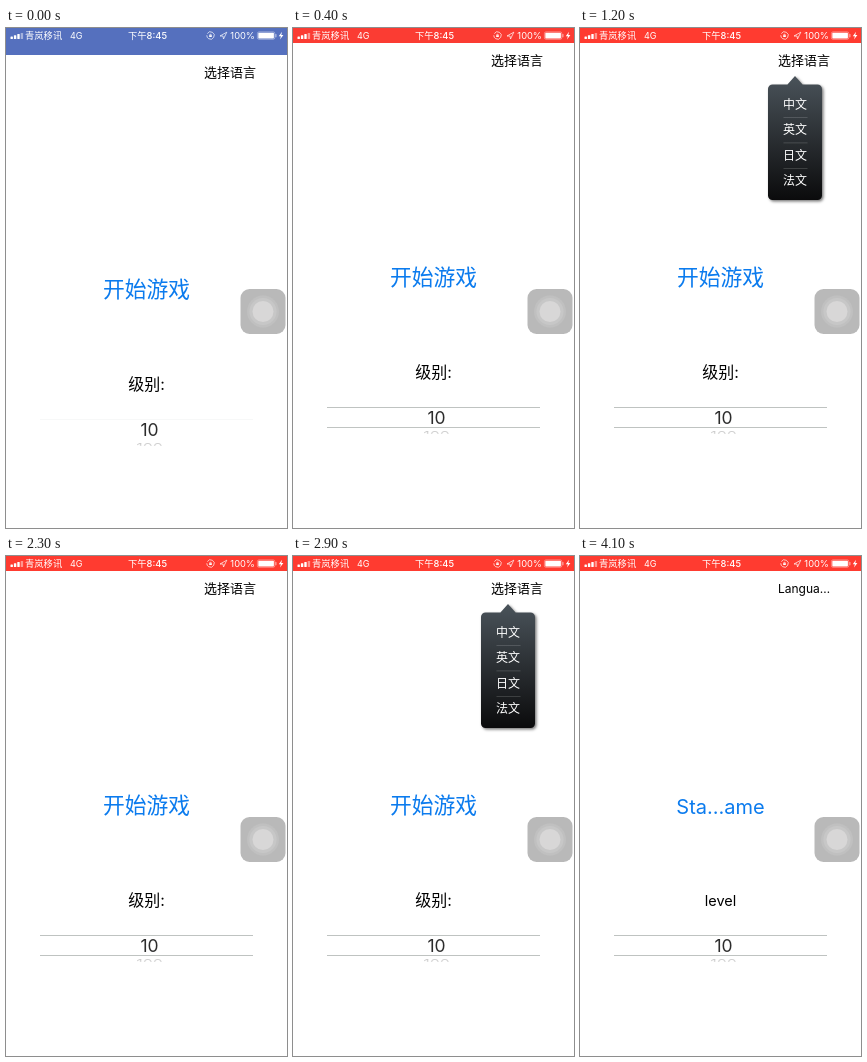
An HTML page with a canvas for the animation above (5000 ms loop, 281x500 px).

```html
<!DOCTYPE html>
<html lang="zh-CN">
<head>
<meta charset="utf-8">
<style>
  html, body { margin: 0; width: 100%; height: 100%; overflow: hidden; background: #fff; }
  canvas { display: block; }
</style>
</head>
<body>
<canvas id="stage" width="281" height="500"></canvas>
<script>
const ctx = document.getElementById('stage').getContext('2d');
const LOOP = 5000, STEP = 100;
const FONT = 'Inter, "Noto Sans CJK SC", "Noto Sans CJK", sans-serif';
const ITEMS = ['中文', '英文', '日文', '法文'];

const mix = (a, b, k) => a + (b - a) * k;

// y is the middle of the glyphs
function text(str, x, y, size, color = '#000', align = 'center', weight = 400) {
  ctx.font = `${weight} ${size}px ${FONT}`;
  ctx.textAlign = align;
  ctx.fillStyle = color;
  ctx.fillText(str, x, y + size * 0.37);
}

function box(x, y, w, h, color, radius = 0) {
  ctx.fillStyle = color;
  ctx.beginPath();
  ctx.roundRect(x, y, w, h, radius);
  ctx.fill();
}

function disc(x, y, r, color) {
  ctx.fillStyle = color;
  ctx.beginPath();
  ctx.arc(x, y, r, 0, Math.PI * 2);
  ctx.fill();
}

function polygon(points) {
  ctx.beginPath();
  points.forEach(([x, y]) => ctx.lineTo(x, y));
  ctx.closePath();
}

function vertical(y0, y1, from, to) {
  const g = ctx.createLinearGradient(0, y0, 0, y1);
  g.addColorStop(0, from);
  g.addColorStop(1, to);
  return g;
}

function statusBar(k, dy) {
  const rgb = [mix(255, 85, k), mix(59, 112, k), mix(48, 190, k)].map(Math.round);
  box(0, 0, 281, 15 + dy, `rgb(${rgb})`);

  for (let i = 0; i < 4; i++) {
    const h = 2.5 + i * 1.2;
    box(4.5 + i * 3.4, 11 - h, 2.4, h, i < 3 ? '#fff' : '#fff7', 0.5);
  }
  text('青岚移讯', 19, 7.8, 9.3, '#fff', 'left');
  text('4G', 64, 7.8, 9, '#fff', 'left');
  text('下午8:45', 141.5, 7.8, 9.3, '#fff', 'center', 500);
  text('100%', 249, 7.8, 9.3, '#fff', 'right');

  // rotation lock
  ctx.strokeStyle = '#fff';
  ctx.lineWidth = 0.7;
  ctx.beginPath();
  ctx.arc(204.5, 7.5, 3.7, -2.6, 3.2);
  ctx.stroke();
  box(203.2, 7.2, 2.6, 1.8, '#fff');
  ctx.beginPath();
  ctx.arc(204.5, 7.2, 0.9, Math.PI, 0);
  ctx.stroke();

  // location arrow
  polygon([[214, 8], [220.8, 4.2], [217.5, 11], [217, 8]]);
  ctx.stroke();

  // battery and bolt
  ctx.strokeStyle = '#fff8';
  ctx.beginPath();
  ctx.roundRect(251.4, 3.9, 17.4, 7.4, 1.6);
  ctx.stroke();
  box(252.3, 4.8, 15.6, 5.6, '#fff', 0.7);
  box(269.3, 6, 1.2, 3.2, '#fff8', 0.5);
  polygon([[276, 3.8], [272.8, 8.2], [274.9, 8.2], [274, 11.4], [277.4, 6.9], [275.3, 6.9]]);
  ctx.fillStyle = '#fff';
  ctx.fill();
}

function picker(t, k, dy) {
  const line = (y, alpha) => {
    ctx.globalAlpha = alpha;
    box(34, y + dy, 213, 1, '#bfc3c1');
    ctx.globalAlpha = 1;
  };
  line(379, t < 300 ? 0.12 : 1);
  line(399, t < 100 ? 0 : 1 - k);
  text('10', 143.5, 389.5 + dy, 17.5, '#2c2c2c');

  ctx.save();
  ctx.beginPath();
  ctx.rect(120, 401 + dy, 46, 5);
  ctx.clip();
  ctx.translate(143.5, 406.5 + dy);
  ctx.scale(1, 0.68);
  text('100', 0, 0, 16, vertical(-6, 2, '#c4c4c4', '#eee'));
  ctx.restore();
}

function assistiveButton() {
  box(234.5, 261, 45, 45, '#b9b9b9', 9);
  disc(257, 283.5, 16, '#c0c0c0');
  disc(257, 283.5, 13.5, '#c7c7c7');
  disc(257, 283.5, 10.5, '#d8d7d7');
}

// The panel grows from the tip of its arrow; labels show only at full size.
function menu(scale, selected) {
  ctx.save();
  ctx.globalAlpha = Math.pow(scale, 1.25);
  ctx.translate(215, 48);
  ctx.scale(scale, scale);
  ctx.translate(-215, -48);

  ctx.save();
  ctx.shadowColor = '#0008';
  ctx.shadowBlur = 3;
  ctx.shadowOffsetX = ctx.shadowOffsetY = 1.5;
  ctx.fillStyle = vertical(48, 172, '#4a535a', '#0b0b0c');
  ctx.beginPath();
  ctx.roundRect(188, 56.5, 54, 115.5, 4.5);
  ctx.moveTo(215, 48);
  ctx.lineTo(223, 57);
  ctx.lineTo(207, 57);
  ctx.closePath();
  ctx.fill();
  ctx.restore();

  if (scale === 1) {
    ITEMS.forEach((label, i) => {
      const y = 76.5 + i * 25.5;
      if (i === selected) box(189.5, y - 12.5, 51, 25, vertical(y - 12, y + 12, '#3778de', '#1a5bbd'), 2);
      if (i) box(203.5, y - 13, 24, 0.8, '#ffffff30');
      text(label, 215, y, 12, '#fff', 'center', 500);
    });
  }
  ctx.restore();
}

function menuScale(t) {
  const opening = start => mix(0.19, 1, Math.min(1, (t - start) / 200));
  if (t >= 1000 && t < 2300) return opening(1000);
  if (t >= 2700 && t < 4000) return opening(2700);
  return t === 4000 ? 0.4 : 0;
}

function draw(time) {
  const t = Math.floor(time % LOOP / STEP) * STEP;
  const k = Math.pow(1 - Math.min(t / 500, 1), 2.4);
  const dy = Math.round(12 * k);
  const english = t >= 4000;
  const blue = '#0b7bee';

  box(0, 0, 281, 500, '#fff');
  statusBar(k, dy);
  if (english) {
    text('Langua…', 198, 32.5, 12, '#000', 'left');
    text('Sta…ame', 140.5, 250.5, 20, blue);
    text('level', 140.5, 345, 14.5);
  } else {
    text('选择语言', 198, 32.2 + dy, 13, '#000', 'left');
    text('开始游戏', 140.5, 249 + dy, 21.8, blue);
    text('级别:', 140.5, 344 + dy, 16);
  }
  picker(t, k, dy);
  assistiveButton();

  const scale = menuScale(t);
  if (scale) menu(scale, t === 3900 ? 1 : -1);
}

const start = performance.now();
function tick() {
  draw(performance.now() - start);
  requestAnimationFrame(tick);
}
tick();
</script>
</body>
</html>
```
